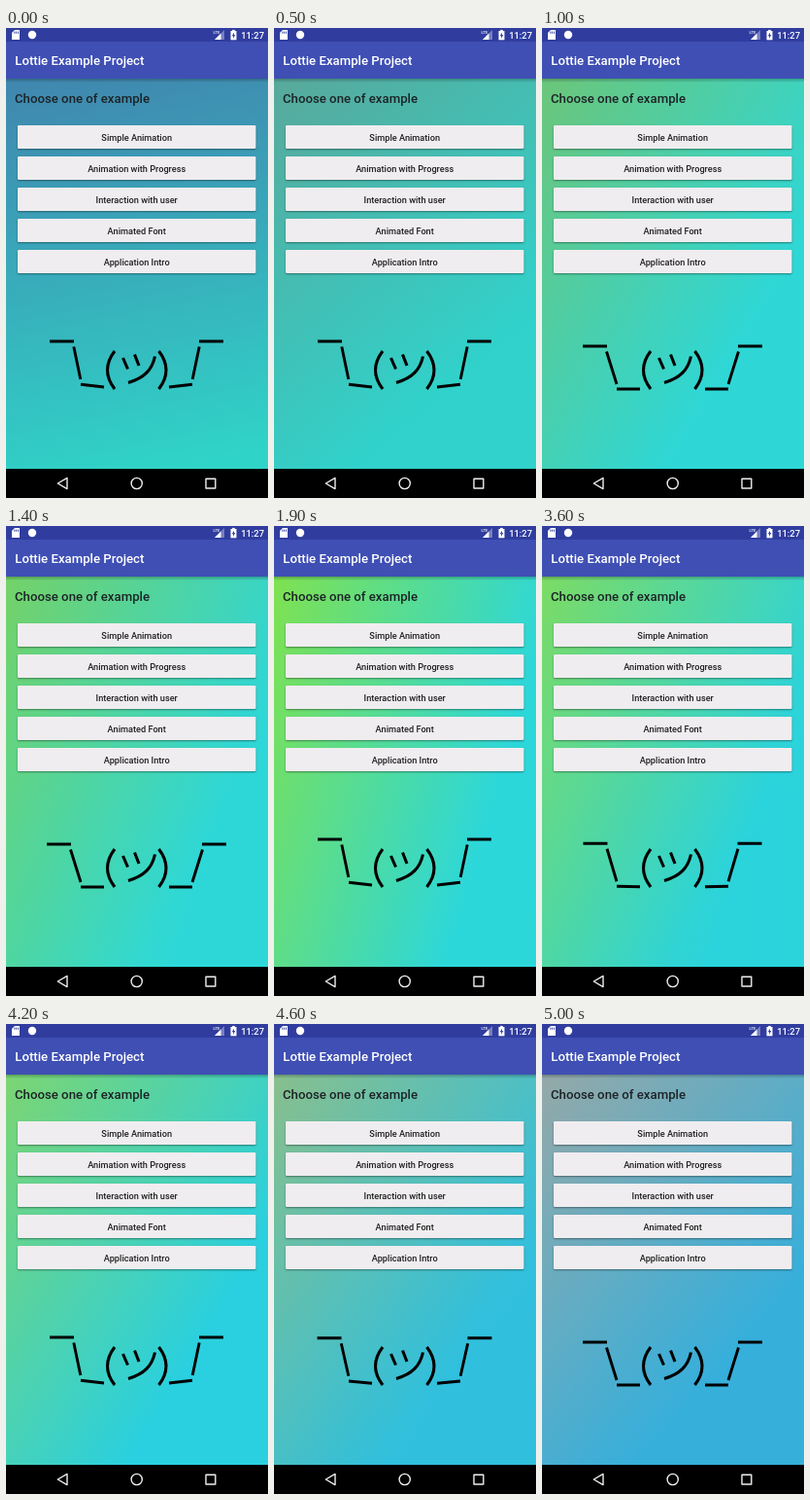
Recreate the animation shown at these times as an HTML page with a canvas. Size 270x483 px, loop 5.1 s.

```html
<!DOCTYPE html>
<html lang="en">
<head>
<meta charset="utf-8">
<title>Lottie Example Project</title>
<style>
  html, body { margin: 0; width: 100%; height: 100%; overflow: hidden; background: #000; }
  canvas { display: block; width: 270px; height: 483px; }
</style>
</head>
<body>
<canvas id="stage"></canvas>
<script>
const W = 270, H = 483, LOOP = 5100, STEP = 100;
const TOOLBAR_TOP = 14, CONTENT_TOP = 52, CONTENT_BOTTOM = 453;

const canvas = document.getElementById('stage');
const ctx = canvas.getContext('2d');
const ratio = window.devicePixelRatio || 1;
canvas.width = W * ratio;
canvas.height = H * ratio;
ctx.scale(ratio, ratio);

// Backdrop gradients: time, axis start, axis end, colours
const backdrops = [
  { at: 0,    from: [70, 52], to: [150, 453], colors: ['#4088af', '#30d3c7'] },
  { at: 500,  from: [0, 60],  to: [230, 330], colors: ['#58a99b', '#30d2cb'] },
  { at: 1000, from: [0, 70],  to: [265, 230], colors: ['#6ac67c', '#2ed7d6'] },
  { at: 1900, from: [0, 70],  to: [268, 150], colors: ['#7ee152', '#2cd7da'] },
  { at: 2900, from: [0, 70],  to: [268, 155], colors: ['#7be256', '#2cd7d8'] },
  { at: 4200, from: [0, 60],  to: [265, 220], colors: ['#7bd573', '#2ad0df'] },
  { at: 5000, from: [0, 60],  to: [250, 280], colors: ['#93a9a9', '#36afdb'] }
];

const labels = ['Simple Animation', 'Animation with Progress', 'Interaction with user',
  'Animated Font', 'Application Intro'];

const mix = (a, b, u) => a + (b - a) * u;
const smooth = (a, b, t) => {
  const u = Math.min(1, Math.max(0, (t - a) / (b - a)));
  return u * u * (3 - 2 * u);
};

function rect(x, y, w, h, color) {
  ctx.fillStyle = color;
  ctx.fillRect(x, y, w, h);
}

function polygon(points) {
  ctx.beginPath();
  points.forEach(([x, y]) => ctx.lineTo(x, y));
  ctx.closePath();
}

function text(str, x, y, size, color, align = 'left') {
  ctx.font = `500 ${size}px Roboto, sans-serif`;
  ctx.textAlign = align;
  ctx.fillStyle = color;
  ctx.fillText(str, x, y);
}

function paintBackdrop({ from, to, colors }, alpha) {
  const gradient = ctx.createLinearGradient(...from, ...to);
  colors.forEach((color, i) => gradient.addColorStop(i, color));
  ctx.globalAlpha = alpha;
  rect(0, CONTENT_TOP, W, CONTENT_BOTTOM - CONTENT_TOP, gradient);
  ctx.globalAlpha = 1;
}

function drawBackdrop(t) {
  let i = 0;
  while (i < backdrops.length - 2 && t >= backdrops[i + 1].at) i++;
  const a = backdrops[i], b = backdrops[i + 1];
  paintBackdrop(a, 1);
  paintBackdrop(b, Math.min(1, (t - a.at) / (b.at - a.at)));
}

function drawStatusBar() {
  rect(0, 0, W, TOOLBAR_TOP, '#303d9f');
  ctx.fillStyle = '#fff';
  polygon([[9, 2], [14, 2], [14, 12], [6, 12], [6, 5]]);
  ctx.fill();
  for (const x of [8.4, 10.2, 12]) rect(x, 3.6, 0.9, 2.2, '#303d9f');

  ctx.fillStyle = '#fff';
  ctx.beginPath();
  ctx.arc(27, 7, 4.2, 0, Math.PI * 2);
  ctx.fill();

  text('LTE', 213.5, 5.5, 4.3, '#fff');
  ctx.fillStyle = 'rgba(255,255,255,.35)';
  polygon([[225, 2], [225, 12], [215, 12]]);
  ctx.fill();
  ctx.fillStyle = '#fff';
  polygon([[221.5, 5.5], [221.5, 12], [215, 12]]);
  ctx.fill();

  rect(231.5, 3, 6, 9.3, '#fff');
  rect(233.2, 1.9, 2.6, 1.2, '#fff');
  ctx.fillStyle = '#303d9f';
  polygon([[235.1, 4.4], [232.8, 8.2], [234.2, 8.2], [234, 11], [236.3, 7.1], [234.9, 7.1]]);
  ctx.fill();
  text('11:27', 266, 10.5, 9.4, '#fff', 'right');
}

function drawToolbar() {
  rect(0, TOOLBAR_TOP, W, CONTENT_TOP - TOOLBAR_TOP, '#3f4fb4');
  const shade = ctx.createLinearGradient(0, CONTENT_TOP, 0, CONTENT_TOP + 4);
  shade.addColorStop(0, 'rgba(0,0,0,.25)');
  shade.addColorStop(1, 'rgba(0,0,0,0)');
  rect(0, CONTENT_TOP, W, 4, shade);
  text('Lottie Example Project', 9.3, 38.3, 13.2, '#fff');
}

function drawButton(label, i) {
  const y = 100 + i * 32;
  ctx.save();
  ctx.shadowColor = 'rgba(0,0,0,.4)';
  ctx.shadowBlur = 2 * ratio;
  ctx.shadowOffsetY = ratio;
  ctx.fillStyle = '#efedef';
  ctx.beginPath();
  ctx.roundRect(12, y, 245.5, 24, 1.3);
  ctx.fill();
  ctx.restore();
  text(label, 134.7, y + 15.6, 9.2, '#202020', 'center');
}

function drawArm(u) {
  ctx.beginPath();
  ctx.moveTo(mix(45, 42, u), mix(322, 327, u));
  ctx.lineTo(mix(70, 67, u), mix(322, 327, u));
  ctx.moveTo(mix(69.8, 66.5, u), mix(327.5, 332.5, u));
  ctx.lineTo(mix(76.8, 77, u), mix(361, 366, u));
  ctx.moveTo(77, mix(366.3, 371, u));
  ctx.lineTo(101, mix(369, 371, u));
  ctx.stroke();
}

function drawFace() {
  ctx.beginPath();
  ctx.moveTo(112, 332);
  ctx.quadraticCurveTo(97, 351.5, 112, 371);
  ctx.moveTo(157.5, 332);
  ctx.quadraticCurveTo(172.5, 351.5, 157.5, 371);
  ctx.moveTo(120.5, 339);
  ctx.lineTo(125.5, 350.5);
  ctx.moveTo(132.5, 335.5);
  ctx.lineTo(137, 347);
  ctx.moveTo(153.5, 337.5);
  ctx.bezierCurveTo(150.5, 351, 143, 359.5, 126, 364.5);
  ctx.stroke();
}

// Arms drop, rest, and lift again every two seconds
function drawShrug(t) {
  const phase = t % 2000;
  const drop = smooth(500, 900, phase) - smooth(1500, 1900, phase);
  ctx.strokeStyle = '#000';
  ctx.lineWidth = 2.9;
  drawArm(drop);
  ctx.save();
  ctx.translate(269, 0);
  ctx.scale(-1, 1);
  drawArm(drop);
  ctx.restore();
  ctx.lineWidth = 3.1;
  drawFace();
}

function drawNavBar() {
  rect(0, CONTENT_BOTTOM, W, H - CONTENT_BOTTOM, '#000');
  ctx.strokeStyle = '#eee';
  ctx.lineWidth = 1.4;
  ctx.lineJoin = 'round';
  polygon([[53.3, 468], [63, 462.4], [63, 473.6]]);
  ctx.stroke();
  ctx.beginPath();
  ctx.arc(134.7, 468, 5.6, 0, Math.PI * 2);
  ctx.stroke();
  ctx.strokeRect(206, 463.2, 9.8, 9.8);
}

function render(t) {
  drawBackdrop(t);
  drawStatusBar();
  drawToolbar();
  text('Choose one of example', 9, 76.6, 13.2, '#1c2326');
  labels.forEach(drawButton);
  drawShrug(t);
  drawNavBar();
}

const start = performance.now();
function tick() {
  const t = (performance.now() - start) % LOOP;
  render(Math.floor(t / STEP) * STEP);
  requestAnimationFrame(tick);
}
tick();
</script>
</body>
</html>
```
